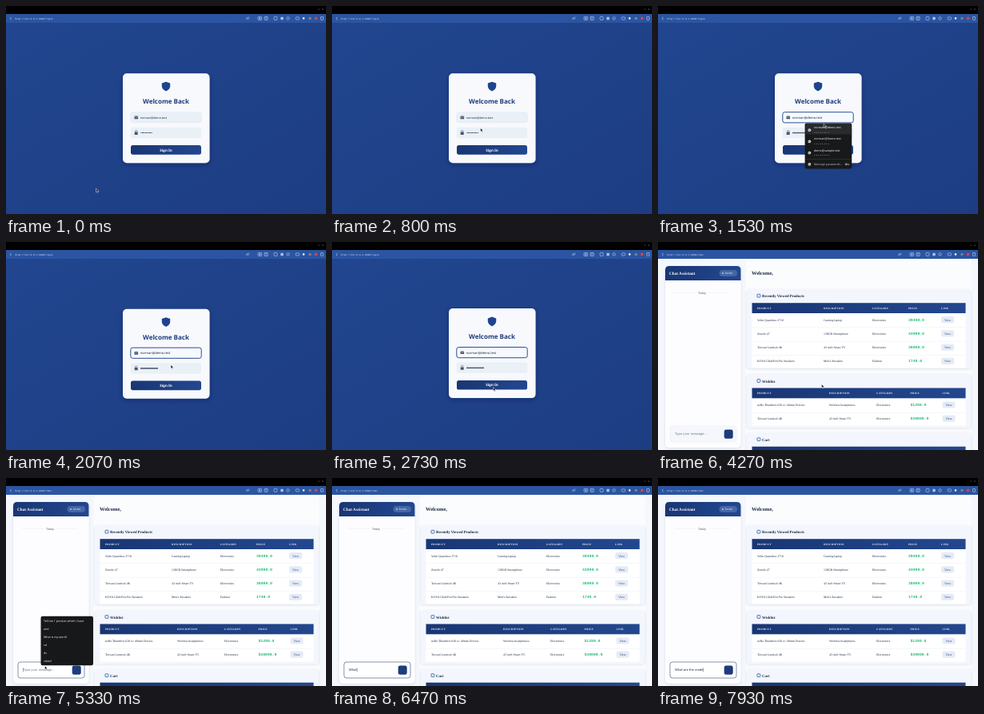
Animation of 400 by 260 pixels, one loop 8 s. Source, as an HTML page:

```html
<!DOCTYPE html>
<html lang="en">
<head>
<meta charset="utf-8">
<title>Sign in and chat</title>
<style>
html, body { margin: 0; width: 100%; height: 100%; overflow: hidden; background: #000; }
svg { display: block; width: 100vw; height: 100vh; }
text { text-rendering: geometricPrecision; white-space: pre; }
.sans { font-family: "Noto Sans", "Open Sans", sans-serif; }
.ui { font-family: Inter, Roboto, sans-serif; }
.serif { font-family: "Liberation Serif", serif; }
.mono { font-family: "Liberation Mono", monospace; }
.b { font-weight: 700; }
</style>
</head>
<body>
<svg id="stage" viewBox="0 0 400 260" preserveAspectRatio="none"></svg>
<script>
const NAVY = '#1d3c7c', INK = '#1c2740', LOOP = 8000;
const EMAIL = 'norman@demo.test', MESSAGE = 'What are the credit';

const rect = (x, y, w, h, fill, r = 0, extra = '') =>
  `<rect x="${x}" y="${y}" width="${w}" height="${h}" rx="${r}" fill="${fill}" ${extra}/>`;
const text = (x, y, size, fill, cls, str, extra = '') =>
  `<text x="${x}" y="${y}" font-size="${size}" fill="${fill}" class="${cls}" ${extra}>${str}</text>`;
const path = (d, stroke, width = 0.6, fill = 'none') =>
  `<path d="${d}" fill="${fill}" stroke="${stroke}" stroke-width="${width}" stroke-linecap="round"/>`;
const dot = (x, y, r, fill, extra = '') => `<circle cx="${x}" cy="${y}" r="${r}" fill="${fill}" ${extra}/>`;
const group = (id, body) => `<g id="${id}">${body}</g>`;
const middle = 'text-anchor="middle"';

const defs = `<defs>
  <linearGradient id="page" x2="1" y2="1"><stop stop-color="#21468f"/><stop offset="1" stop-color="#1d3d83"/></linearGradient>
  <linearGradient id="navy" x2="1" y2="0"><stop stop-color="#193674"/><stop offset="1" stop-color="#23478f"/></linearGradient>
  <filter id="shadow" x="-20%" y="-20%" width="140%" height="150%">
    <feDropShadow dx="0" dy="2" stdDeviation="3" flood-color="#081a42" flood-opacity=".35"/></filter>
  <filter id="soft" x="-10%" y="-10%" width="120%" height="125%">
    <feDropShadow dx="0" dy="1" stdDeviation="1.5" flood-color="#1e3c72" flood-opacity=".12"/></filter>
</defs>`;

function browserBar() {
  const pale = '#c6d5f0';
  const outline = `stroke="${pale}" stroke-width=".6"`;
  return rect(0, 0, 400, 10, '#000') + rect(0, 10, 400, 11, '#2b55a2') +
    dot(391, 4, 0.5, '#aaa') + dot(396, 4, 0.6, '#bbb') +
    path('M6.3 14.4 L5 15.6 L6.3 16.8', '#dfe8f8') +
    `<text id="url" x="11" y="16.6" font-size="2.96" fill="#dfe8f8" class="mono"></text>` +
    path('M300.7 16.8 L303.7 13.8 M300.5 15.5 L301.8 14.3 M302.6 16.4 L304 15.2', pale) +
    rect(315, 13.4, 4.6, 4, 'none', 0.6, outline) + dot(317.3, 15.4, 1, pale) +
    rect(323, 13.4, 4.2, 4, 'none', 0.6, outline) + path('M324 14.5 H326 M324 16 H326', pale, 0.4) +
    rect(335, 13.4, 4, 4, 'none', 1, outline) + dot(345, 15.4, 2, '#a9bfe6') +
    dot(352.5, 15.4, 1.7, 'none', outline) +
    rect(362, 13.8, 4.6, 3.2, 'none', 1.4, outline) + dot(372, 15.4, 1.3, '#e8e5df') +
    dot(380, 15.4, 1.7, '#708f83') + dot(387.5, 15.4, 1.8, '#d9444b') +
    rect(393.5, 13.5, 3, 3.8, 'none', 0.5, outline);
}

function login() {
  const mail = rect(160.5, 137.6, 4.6, 3.6, '#4a556d', 0.5) +
    path('M160.8 138.1 L162.8 139.6 L164.8 138.1', '#fff', 0.4);
  const lock = rect(160.7, 157.6, 4, 3.3, '#4a556d', 0.5) +
    path('M161.5 157.6 V156.7 A1.2 1.2 0 0 1 163.9 156.7 V157.6', '#4a556d');
  const field = (id, y) => `<rect id="${id}" x="155.8" y="${y}" width="88.4" height="13.2" rx="2.6" fill="#e9f0f6"/>`;
  return rect(0, 21, 400, 239, 'url(#page)') + group('card',
    rect(146, 84.3, 108.5, 112, '#f8f9fd', 5, 'filter="url(#shadow)"') +
    path('M200 94.8 L205.2 96.6 V100.5 Q204.8 104.3 200 106.6 Q195.2 104.3 194.8 100.5 V96.6 Z', 'none', 0, '#1f448e') +
    text(200, 122.2, 8, NAVY, 'sans b', 'Welcome Back', middle) +
    field('emailField', 132.7) + field('passField', 151.8) + mail + lock +
    `<text id="email" x="167.7" y="140.9" fill="${INK}" class="sans">${EMAIL}</text>` +
    group('password', Array.from({ length: 11 }, (_, i) => dot(i * 2, 0, 0.85, INK)).join('')) +
    rect(156, 174.1, 88, 11.6, 'url(#navy)', 2.6, 'id="button"') +
    group('signIn', text(200, 181.6, 4.5, '#fff', 'sans b', 'Sign In', middle)) +
    group('signing', text(189.6, 181.6, 4.4, '#fff', 'sans b', 'Signing In...') +
      group('spinner', path('M0 -1.8 A1.8 1.8 0 1 1 -1.8 0', '#fff'))));
}

function passwordMenu() {
  const globe = y => dot(189.3, y, 1.9, '#d6d6d6') + path(`M188 ${y} h1.4 l.7 1`, '#333', 0.5);
  const account = (name, i) => {
    const y = 153.2 + i * 14.2;
    const dots = Array.from({ length: 8 }, (_, k) => dot(196 + k * 2.45, y + 4.8, 0.5, '#999')).join('');
    return globe(y + 2) + text(195, y, 3.6, '#f2f2f2', 'sans', name) + dots;
  };
  return group('accounts', rect(183.6, 146.4, 58.6, 57, '#18191b', 2.2) +
    rect(184.5, 147, 56.8, 13.5, '#292a2d', 1.5) +
    [EMAIL, 'norman@home.test', 'demo@sample.test'].map(account).join('') +
    rect(184, 191, 57.8, 0.4, '#45464a') + globe(197.8) +
    text(195, 199, 3.6, '#b8b8b8', 'sans', 'Manage passwords...') +
    dot(235.2, 197.8, 1, 'none', 'stroke="#ddd" stroke-width=".7"') + path('M236.4 197.8 H238.8 V198.7', '#ddd'));
}

function section(top, height, title, columns, rows) {
  const head = top + 17.2;
  const cells = rows.map((row, i) => {
    const y = head + 22.3 + i * 17.2;
    const line = i ? rect(117.5, y - 9, 267, 0.4, '#e3e8f1') : '';
    const words = row.map((cell, c) => c === 3
      ? text(columns[c], y, 4.75, '#25bb78', 'mono b', cell)
      : text(columns[c], y, 3.85, INK, 'serif', cell)).join('');
    return line + words + rect(columns[4], y - 5.4, 16, 8.2, '#e5ebf6', 2) +
      text(columns[4] + 8, y, 3.8, NAVY, 'serif', 'View', middle);
  }).join('');
  const names = ['PRODUCT', 'DESCRIPTION', 'CATEGORY', 'PRICE', 'LINK'];
  return rect(111, top, 280, height, '#f3f6fc', 4, 'filter="url(#soft)"') +
    rect(124, top + 6.3, 3.8, 3.8, 'none', 0.5, 'stroke="#2b57a6" stroke-width=".8"') +
    text(130, top + 10.2, 4.75, INK, 'serif b', title) +
    rect(117.5, head, 267, Math.min(13 + rows.length * 17.1, height - 17), '#fff', 2) +
    rect(117.5, head, 267, 12.8, 'url(#navy)') +
    names.map((n, c) => text(columns[c], head + 7.6, 3.3, '#eef3fc', 'serif b', n, 'letter-spacing=".25"')).join('') + cells;
}

function dashboard() {
  const tv = ['Torvani Lumisol 4K', '43 inch Smart TV', 'Electronics'];
  const wish = [124, 214, 273, 315.5, 355.5];
  return rect(0, 21, 400, 239, '#f4f7fc') + rect(110, 21, 281.5, 239, '#fbfcfe') +
    text(117, 41.4, 6.5, INK, 'serif b', 'Welcome,') +
    section(59, 99, 'Recently Viewed Products', [124, 207, 267.7, 313, 354], [
      ['Velm Quandora 2710', 'Gaming laptop', 'Electronics', '39498.0'],
      ['Zonelo 47', '128GB Smartphone', 'Electronics', '43999.0'],
      [...tv, '38000.0'],
      ['KOVA GlideFen Pro Sneakers', 'Men\'s Sneakers', 'Fashion', '1748.0']]) +
    section(165.3, 67, 'Wishlist', wish, [
      ['neRo Thumbrix 620 w/ 40mm Drivers', 'Wireless headphones', 'Electronics', '$1298.0'],
      [...tv, '$38000.0']]) +
    section(238.5, 40, 'Cart', wish, []) +
    rect(9, 30, 94.5, 227, '#fdfdff', 5, 'filter="url(#soft)"') +
    path('M9 48 V35 Q9 30 14 30 H98.500 Q103.500 30 103.500 35 V48 Z', 'none', 0, 'url(#navy)') +
    text(14, 41, 5.25, '#fff', 'serif b', 'Chat Assistant') +
    rect(76.5, 35, 22.5, 8, '#4666a5', 4) + dot(81, 39, 0.9, '#b9d6e8') +
    text(83.5, 40.2, 3.5, '#e6edfa', 'sans', 'Active') +
    rect(20, 63.3, 27, 0.4, '#dfe5f0') + rect(63, 63.3, 27, 0.4, '#dfe5f0') +
    text(55, 64.7, 3.7, '#566077', 'sans', 'Today', middle) +
    `<rect id="chatField" x="15" y="230" width="83" height="20" rx="3"/>` +
    rect(82.7, 234.6, 11, 11.2, NAVY, 2.4) +
    `<text id="chatText" x="21" y="241.3" font-size="3.95" class="ui"></text>` +
    rect(0, 237.4, 0.4, 5, INK, 0, 'id="caret"');
}

function historyMenu() {
  const items = ['Tell me 1 product which i have', 'and', 'What is my world', 'sd', 'ds', 'sdasd'];
  return group('history', rect(43.5, 172.7, 65.5, 61.5, '#17181a', 2.2) +
    items.map((s, i) => text(47, 180 + i * 9.9, 3.55, '#f0f0f0', 'sans', s)).join(''));
}

const stage = document.getElementById('stage');
stage.innerHTML = defs + group('login', login() + passwordMenu()) +
  group('dashboard', dashboard() + historyMenu()) + browserBar() +
  group('pointer', path('M0 0 V4.300 L1.100 3.300 L1.900 5 L2.700 4.600 L1.900 3 H3.200 Z', '#fff', 0.45, '#111'));

const $ = id => document.getElementById(id);
const show = (id, on) => $(id).setAttribute('display', on ? 'inline' : 'none');
const set = (id, attrs) => Object.entries(attrs).forEach(([k, v]) => $(id).setAttribute(k, v));
const clamp = v => Math.max(0, Math.min(1, v));
const ease = v => v * v * (3 - 2 * v);

// Pointer stops: time, x, y
const route = [[0, 112.5, 228.5], [350, 112.5, 228.5], [950, 199, 139], [1150, 199, 139], [1450, 207, 147.5],
  [1900, 207, 148], [2550, 201.500, 182], [2900, 201.500, 182], [3300, 204, 177.500], [4350, 204.500, 178],
  [5050, 48.500, 235], [8000, 48.500, 235]];

function pointerAt(t) {
  const i = route.findIndex((stop, k) => k && t <= stop[0]);
  const [a, b] = [route[i - 1], route[i]];
  const k = ease((t - a[0]) / (b[0] - a[0]));
  return [a[1] + (b[1] - a[1]) * k, a[2] + (b[2] - a[2]) * k];
}

function draw(t) {
  const inside = t >= 3930, signing = t >= 2950;
  show('login', !inside);
  show('dashboard', inside);
  $('url').textContent = 'http://127.0.0.1:8000/' + (inside ? 'chat' : 'login');

  const lift = ease(clamp((t - 1950) / 250));
  const preview = t >= 1400;
  const focused = t >= 1030 && !signing;
  set('card', { transform: `translate(0 ${-1.2 * lift})` });
  set('emailField', { stroke: focused ? '#2b4f94' : '#dfe6f0', 'stroke-width': focused ? 1 : 0.4,
    fill: focused ? '#f6f9fe' : '#e9f0f6' });
  set('email', { 'font-size': preview ? 4 : 3.55 });
  set('password', { transform: `translate(169 158.5) scale(${preview ? 1 : 0.66})` });
  set('button', { opacity: signing ? 0.76 : 1 });
  show('signIn', !signing);
  show('signing', signing);
  set('spinner', { transform: `translate(186 180) rotate(${t * 0.36})` });
  show('accounts', t >= 1080 && t < 1880);

  const chatting = t >= 5130;
  const typed = MESSAGE.slice(0, Math.max(0, Math.floor((t - 6050) / 97)));
  set('chatField', { fill: chatting ? '#fff' : '#f5f7fc', stroke: chatting ? '#66789c' : '#e4e9f3',
    'stroke-width': chatting ? 0.8 : 0.5 });
  $('chatText').textContent = typed || 'Type your message...';
  set('chatText', { fill: typed ? INK : '#69748a' });
  show('history', t >= 5200 && !typed);
  show('caret', chatting);
  if (chatting) set('caret', { x: 21.2 + (typed ? $('chatText').getComputedTextLength() : 0) });

  const [x, y] = pointerAt(t);
  set('pointer', { transform: `translate(${x} ${y})` });
  show('pointer', !typed);
}

const start = performance.now();
function tick() {
  draw((performance.now() - start) % LOOP);
  requestAnimationFrame(tick);
}
tick();
</script>
</body>
</html>
```
